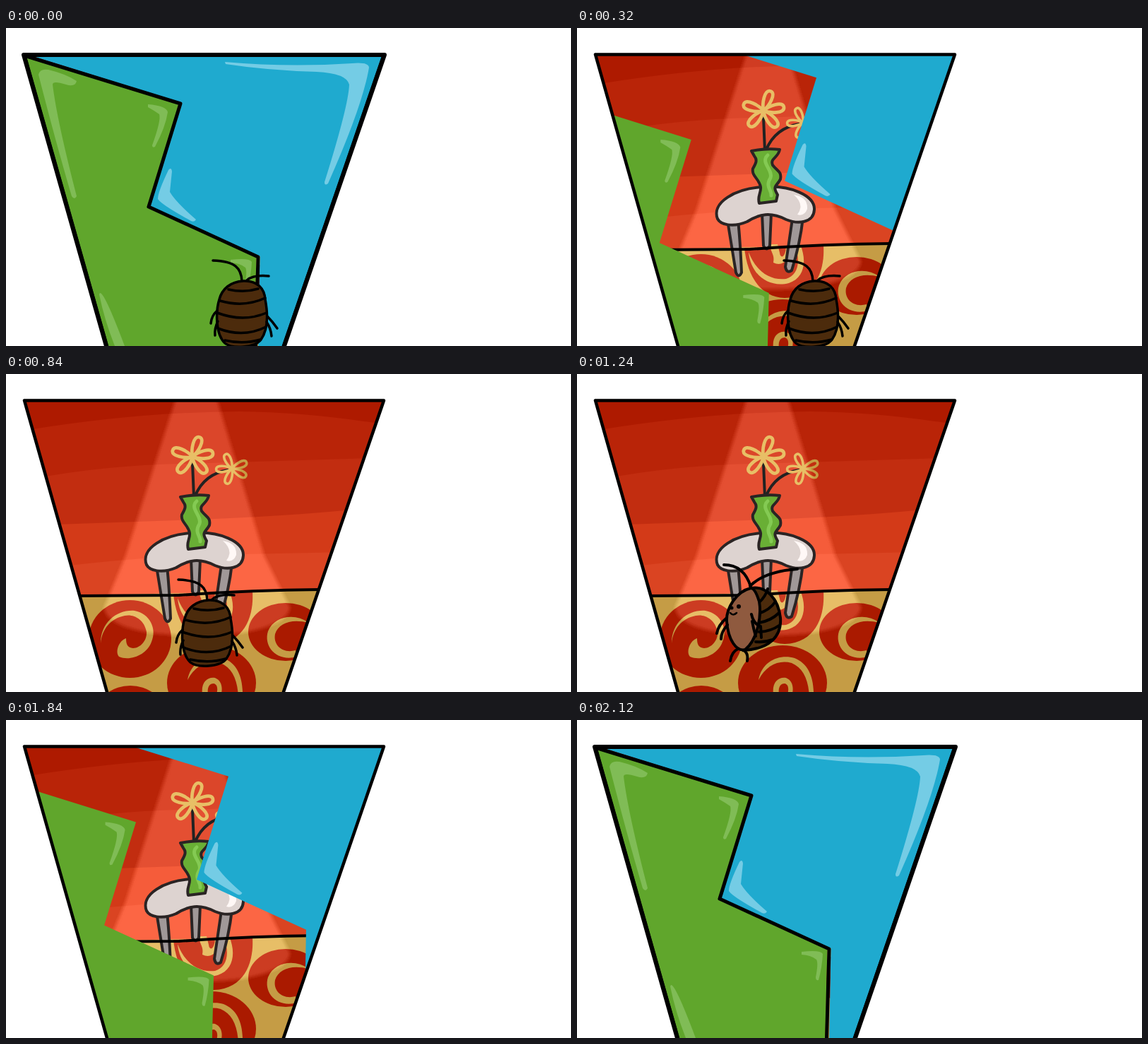
An HTML page for the animation above (2240 ms loop, 800 px wide and 450 px high).

```html
<!DOCTYPE html>
<html lang="en">
<head>
<meta charset="utf-8">
<title>Bug behind the doors</title>
<style>
  html, body { margin: 0; width: 100%; height: 100%; overflow: hidden; background: #fff; }
  svg { display: block; width: 100%; height: 100%; }
  .ink { fill: none; stroke: #000; stroke-linecap: round; stroke-linejoin: round; }
  .room { isolation: isolate; }
  .light { mix-blend-mode: plus-lighter; }
  .prop { stroke: #080202; stroke-width: 4; stroke-linejoin: round; stroke-linecap: round; }
</style>
</head>
<body>
<svg viewBox="0 0 800 450">
  <defs>
    <clipPath id="inside"><path d="M26 37H535L382.6 480H151.5Z"/></clipPath>
    <filter id="soft" x="-10%" y="-10%" width="120%" height="120%"><feGaussianBlur stdDeviation="2.5"/></filter>
    <path id="petal" d="M0 0C-5-8-9-28 0-28C9-28 5-8 0 0Z"/>
  </defs>

  <g clip-path="url(#inside)">
    <g class="room">
      <path fill="#ae1a00" d="M0 30H560V330H0Z"/>
      <path fill="#b92408" d="M20 81Q180 54 330 53Q430 54 540 72V330H20Z"/>
      <path fill="#c22d10" d="M40 148Q140 129 250 127L520 119V330H40Z"/>
      <path fill="#d33a18" d="M70 213L270 206Q400 201 490 192V330H70Z"/>
      <path fill="#da4422" d="M80 272Q200 258 290 256L480 252V330H80Z"/>
      <path fill="#c59c45" d="M90 314L450 305V460H90Z"/>
      <g fill="#aa1a00">
        <ellipse cx="175.500" cy="375" rx="58.500" ry="55"/>
        <path d="M237 311L349 308C351 338 341 380 294 382C259 381 241 350 237 311Z"/>
        <ellipse cx="396" cy="365" rx="53" ry="41"/>
        <ellipse cx="291" cy="437" rx="63" ry="53"/>
        <ellipse cx="176" cy="476" rx="46" ry="35"/>
      </g>
      <g fill="#c59c45">
        <path d="M134 381C134 351 158 333 182 335C204 339 214 361 206 379C200 397 176 407 160 400C154 393 160 377 170 374C170 383 172 387 180 388C190 388 200 377 199 365C196 347 180 339 168 342C148 346 136 361 134 381Z"/>
        <path d="M243 317C246 350 272 368 300 361C322 354 326 330 316 306H308C318 332 312 350 296 355C272 358 252 342 243 317Z"/>
        <path d="M272 306C276 320 280 322 278 332C290 338 302 330 303 308H296C296 324 288 328 287 318L284 306Z"/>
        <path d="M428 352C410 338 380 342 371 364C364 386 384 408 412 400L410 391C392 396 378 384 381 368C386 352 405 346 428 352Z"/>
        <path d="M257 433C262 405 288 396 308 402C328 410 336 430 335 458H329C328 432 320 416 304 409C286 404 268 412 257 433Z"/>
        <path d="M279 458C274 438 284 428 296 430C306 434 308 446 303 458H296C301 448 300 439 294 438C286 438 284 447 287 458Z"/>
      </g>

      <g class="prop">
        <path fill="#7e7676" d="M262 262L264 308Q268 317 273 308L275 262Z"/>
        <path fill="#7e7676" d="M213 272Q220 315 225 346Q229 355 233 346Q231 300 228 272Z"/>
        <path fill="#7e7676" d="M305 270Q299 310 295 338Q297 348 304 343Q316 305 320 268Z"/>
        <path fill="#bbb1ae" d="M199 270C190 247 224 227 264 225C302 222 337 237 336 257C335 276 313 278 296 271C274 260 258 263 241 274C220 283 203 278 199 270Z"/>
      </g>
      <path fill="#ded6d4" d="M307 236Q327 239 326 256Q322 267 312 264Q323 250 307 236Z"/>
      <path class="ink" stroke-width="4" d="M266 174L264 126M268 172C276 153 290 140 314 136"/>
      <g class="prop">
        <path fill="#478d13" d="M247 174Q268 170 287 172C285 184 273 184 277 194C284 203 290 203 288 214C283 224 276 223 284 236L282 245L258 248C255 238 261 233 260 225C258 213 247 210 249 199C253 192 256 187 251 181Z"/>
      </g>
      <path fill="none" stroke="#62a831" stroke-width="5" stroke-linecap="round" d="M270 180C259 190 278 201 274 212C266 225 276 229 275 237"/>
      <g id="blooms" fill="none" stroke="#c69d44" stroke-width="4.500"></g>

      <path class="light" filter="url(#soft)" fill="#222220" d="M242 30H297L366 258L402 330C401 353 350 371 270 370C188 371 140 354 139 330L169 258Z"/>
    </g>
    <path class="ink" stroke-width="4" d="M100 314L245 313Q345 306 445 305"/>

    <g id="blue">
      <path fill="#1faacf" transform="translate(2.500 -1)" d="M26 38H535L360 545L353 540L357 324L202 253L247 107Z"/>
      <g fill="#74cce5">
        <path d="M310 48Q400 56 490 50Q514 48 514 56Q505 110 456 220Q451 224 451 218Q485 110 486 80Q482 64 440 62Q370 60 311 51Z"/>
        <path d="M230 201Q234 196 235 203L232 232Q240 246 269 271Q267 275 262 273Q220 250 215 242Q215 232 230 201Z"/>
      </g>
    </g>
    <g id="green">
      <path fill="#60a62c" transform="translate(-2.500 1)" d="M26 38L247 107L202 253L357 324L353 490H155Z"/>
      <g fill="#80bc56">
        <path d="M46 66Q48 57 60 59Q85 65 100 75Q98 84 85 80Q66 74 66 80Q72 130 100 238Q97 244 93 238Q70 160 46 66Z"/>
        <path d="M201 108Q227 110 229 119Q226 140 211 168Q207 170 207 166Q220 130 217 122Q210 117 201 112Z"/>
        <path d="M318 328Q345 325 348 331Q347 350 342 368Q338 369 338 364Q342 344 339 339Q332 333 318 332Z"/>
        <path d="M133 375Q139 373 168 450H154Q139 412 132 377Z"/>
      </g>
    </g>
  </g>

  <path class="ink" stroke-width="4.500" d="M26 37.500H535L382.6 480H151.5Z"/>
  <g id="shut" class="ink" stroke-width="5">
    <path d="M26 39L247 107L202 253L357 324L353 470"/>
    <path stroke-width="6" d="M25 38H536L383.6 480H150.500Z"/>
  </g>

  <g clip-path="url(#inside)">
    <g id="back">
      <path fill="#4c2b0c" stroke="#000" stroke-width="3.500" d="M336 358C356 357 366 369 367 384C371 405 371 427 361 441C352 453 320 454 310 446C296 433 297 400 302 384C306 369 318 359 336 358Z"/>
      <path class="ink" stroke-width="3.500" d="M315 370Q337 375 357 369M303 386Q337 396 367 382M299 403Q336 417 369 403M300 425Q336 439 368 423M310 442Q336 448 360 441"/>
      <path class="ink" stroke-width="3.500" d="M334 358C333 340 325 330 293 329M341 357Q350 349 372 351M299 400Q291 407 290 418M300 415Q295 425 296 435M370 408Q377 415 384 425M369 416Q375 425 376 436"/>
    </g>
    <g id="front">
      <path fill="#4c2b0c" stroke="#000" stroke-width="4" d="M246 303C268 299 285 318 288 345C290 372 272 389 236 391Z"/>
      <path class="ink" stroke-width="4" d="M258 323Q267 315 270 304M257 339Q273 334 281 322M258 352Q275 349 286 338M258 365Q275 364 286 356M253 379Q266 380 277 376"/>
      <path fill="#8f5a3f" stroke="#000" stroke-width="4" d="M246 303C225 308 211 332 212 350C214 377 226 393 238 390C254 378 262 345 258 322C254 309 250 303 246 303Z"/>
      <path class="ink" stroke-width="4" d="M246 301C241 285 230 270 208 270M245 300C260 285 285 278 312 276M212 345Q200 355 198 367M213 355Q204 365 204 375M247 340Q250 354 260 357L261 373M248 350Q250 361 253 371M228 389Q219 393 217 406M236 391Q243 395 241 406"/>
      <path class="ink" stroke-width="2.500" d="M217 338Q221 343 226 338"/>
      <circle cx="229" cy="329" r="3"/><circle cx="219" cy="331" r="2.500"/>
    </g>
  </g>
</svg>
<script>
const LOOP = 2240, STEP = 40;
const $ = id => document.getElementById(id);
const [blue, green, shut, back, front] = ['blue', 'green', 'shut', 'back', 'front'].map($);

function bloom(x, y, size, turns) {
  return turns.map(a =>
    `<use href="#petal" transform="translate(${x} ${y}) rotate(${a}) scale(${size})"/>`).join('');
}
$('blooms').innerHTML =
  bloom(264, 117, 1.05, [20, 80, 140, 223, 288]) + bloom(320, 134, .8, [-24, 66, 119, 200, 268]);

// time, view, dx, dy, scale x, scale y
const poses = [
  [0, back, 0, 0, 1, 1],
  [600, back, 0, 0, 1.03, .87],
  [640, back, -14, -28, .95, 1.12],
  [680, back, -34, -48, .97, 1.08],
  [760, back, -49, -38, 1, .9],
  [840, back, -49, -38, 1, 1],
  [1000, front, 0, 0, .92, 1.33],
  [1080, front, 0, 0, 1, 1.117],
  [1240, front, 0, 0, 1, 1],
  [1360, front, -36, -8, .92, 1.3],
  [1520, front, -63, -3, 1, 1.117],
  [1680, front, -72, -3, 1, 1],
  [1720, front, -105, -12, .92, 1.25],
  [1760, front, -150, -8, .95, 1.2],
  [1800, null]
];
const foot = new Map([[back, [334, 452]], [front, [238, 407]]]);

const ease = p => (1 - Math.cos(Math.PI * Math.min(1, Math.max(0, p)))) / 2;
const gap = t => t < 1000 ? ease((t - 40) / 800) : 1 - ease((t - 1340) / 709);
const show = (el, on) => el.setAttribute('visibility', on ? 'visible' : 'hidden');
const move = (el, x, y) => el.setAttribute('transform', `translate(${x} ${y})`);

function draw(t) {
  const open = gap(t);
  move(blue, 328 * open, -131 * open);
  move(green, -303 * open, 183 * open);
  show(shut, t < 40 || t >= 2080);

  const [, view, dx, dy, sx, sy] = poses.findLast(p => p[0] <= t);
  show(back, view === back);
  show(front, view === front);
  if (!view) return;
  const [x, y] = foot.get(view);
  view.setAttribute('transform',
    `translate(${x + dx} ${y + dy}) scale(${sx} ${sy}) translate(${-x} ${-y})`);
}

const start = performance.now();
function tick() {
  const t = (performance.now() - start) % LOOP;
  draw(Math.floor(t / STEP) * STEP);
  requestAnimationFrame(tick);
}
draw(0);
requestAnimationFrame(tick);
</script>
</body>
</html>
```
